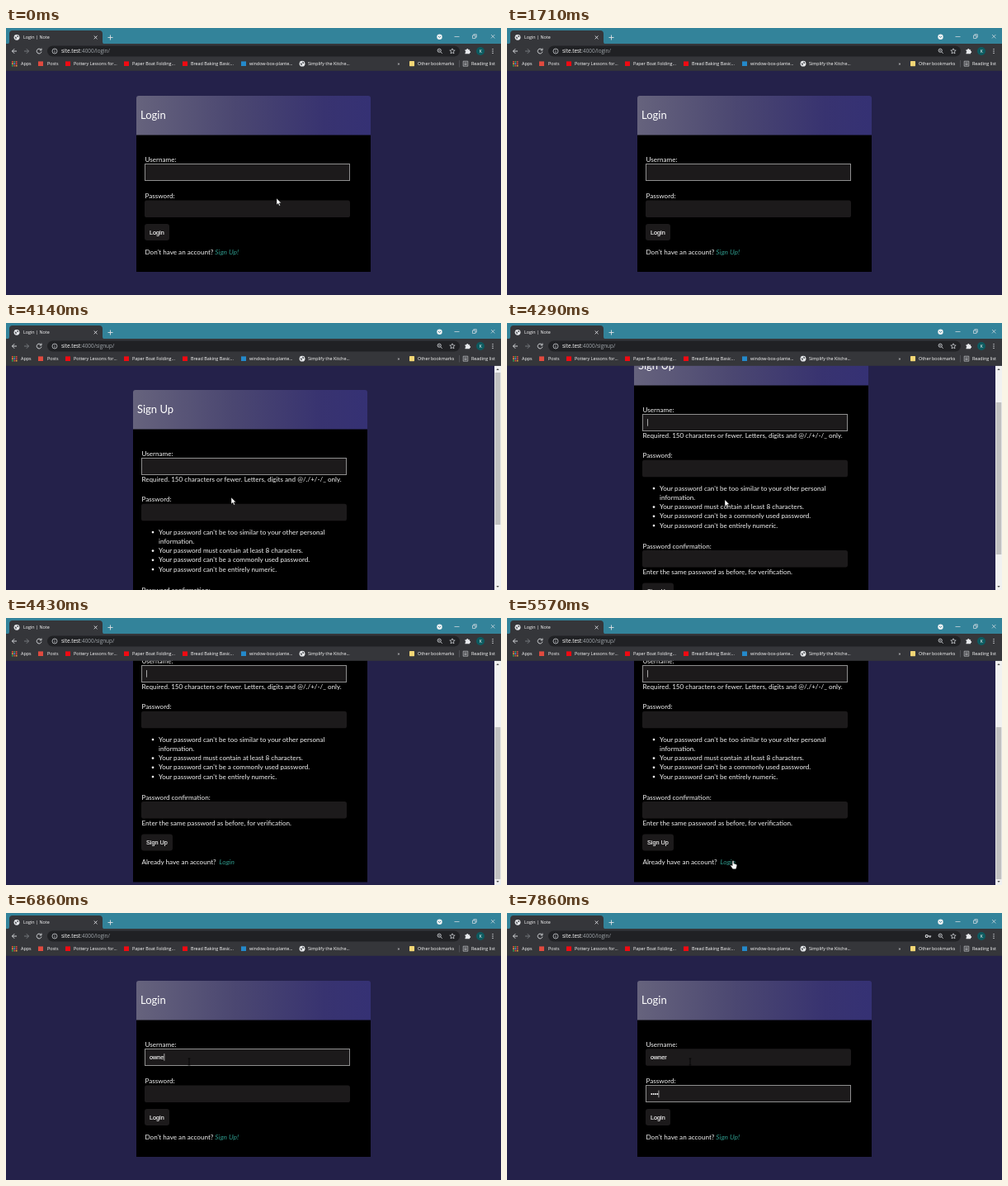
These frames come from a looping animation (600x323 px, 8 s). An HTML page:

```html
<!DOCTYPE html>
<html lang="en">
<head>
<meta charset="utf-8">
<title>Login</title>
<style>
html, body { margin: 0; width: 100%; height: 100%; overflow: hidden; background: #24214a; }
svg { display: block; width: 100vw; height: 100vh; }
text { white-space: pre; }
.ui { font: 5.4px "Open Sans", "Noto Sans", sans-serif; fill: #fff; }
.url { font-size: 6.4px; }
.dim { fill: #a4a9ae; }
.page { font: 400 8.1px Lato, sans-serif; fill: #f4f4f4; }
.head { font: 400 13px Lato, sans-serif; fill: #fff; }
.link { font-size: 8.4px; font-style: italic; fill: #2f9a8c; }
.form { font: 7.25px "Liberation Sans", Arial, sans-serif; fill: #fff; stroke: #fff; stroke-width: .12; }
.icon { fill: none; stroke: #dfe1e5; stroke-width: .9; }
.box { fill: #1c1a1b; }
.focus { fill: none; stroke: #8e8e8e; stroke-width: 1; }
.caret { stroke: #ccc; stroke-width: .8; }
</style>
</head>
<body>
<svg id="stage" viewBox="0 0 600 323" preserveAspectRatio="none"></svg>
<script>
const text = (x, y, str, cls, id = '') =>
  `<text x="${x}" y="${y}" class="${cls}"${id && ` id="${id}"`}>${str}</text>`;
const rect = (x, y, w, h, fill, r = 0) =>
  `<rect x="${x}" y="${y}" width="${w}" height="${h}" rx="${r}" fill="${fill}"/>`;
const dot = (x, y, r, fill) => `<circle cx="${x}" cy="${y}" r="${r}" fill="${fill}"/>`;
const icon = (d, extra = '') => `<path class="icon" d="${d}" ${extra}/>`;

// Page parts share the login card's coordinates.
const field = (label, labelY, y) =>
  text(168.5, labelY, label, 'page') + `<rect class="box" x="168" y="${y}" width="249" height="20.5" rx="2.6"/>`;
const button = (y, w, label) =>
  rect(168, y, w, 20, '#1c1a1b', 3) + text(174, y + 12.5, label, 'form');
const card = (title, height) =>
  rect(158, 100, 284, height - 18, '#000') +
  `<path d="M158 129.5V85a3 3 0 0 1 3-3h278a3 3 0 0 1 3 3v44.5z" fill="url(#band)"/>` +
  text(163, 110, title, 'head');

const loginPage = card('Login', 213) +
  field('Username:', 161.8, 164.3) + field('Password:', 205.8, 208.5) +
  button(237, 30, 'Login') +
  text(168.5, 273.6, "Don't have an account?", 'page') + text(253.3, 273.6, 'Sign Up!', 'page link');

const rules = [
  "Your password can't be too similar to your other personal", 'information.',
  'Your password must contain at least 8 characters.',
  "Your password can't be a commonly used password.",
  "Your password can't be entirely numeric."
];
const signupPage = card('Sign Up', 344.5) +
  field('Username:', 161.8, 164.3) +
  text(168.5, 192.8, 'Required. 150 characters or fewer. Letters, digits and @/./+/-/_ only.', 'page') +
  field('Password:', 217.3, 219.8) +
  rules.map((rule, i) => {
    const y = 256.7 + i * 11.25;
    return text(189, y, rule, 'page') + (i === 1 ? '' : dot(182, y - 2.6, 1.35, '#f4f4f4'));
  }).join('') +
  field('Password confirmation:', 326.8, 328.9) +
  text(168.5, 357.6, 'Enter the same password as before, for verification.', 'page') +
  button(368.6, 38, 'Sign Up') +
  text(168.5, 405.3, 'Already have an account?', 'page') + text(262.5, 405.3, 'Login', 'page link');

const globe = (x, y) => dot(x, y, 3.4, '#e8eaed') +
  `<path d="M${x - 2.4} ${y - 1}l2 .6 .3 1.4-1 1.4zM${x + .3} ${y - 2.6}l2 1.2-.6 1.4-1.4-.8z" fill="#4a4d52"/>`;

const bookmarks = [
  [42, 50, 'Posts', '#e04a3f'],
  [75, 82, 'Pottery Lessons for...', '#f00a12'],
  [146, 153, 'Paper Boat Folding...', '#f00a12'],
  [217, 224, 'Bread Baking Basic...', '#f00a12'],
  [288, 295, 'window-box-plante...', '#2489ca'],
  [359, 366, 'Simplify the Kitche...']
];
const gridColors = ['#ea4335', '#f2a33a', '#34a853', '#4f86ec', '#d94a45'];
const appGrid = Array.from({ length: 9 }, (_, i) =>
  rect(7 + i % 3 * 2.4, 40 + Math.floor(i / 3) * 2.4, 1.7, 1.7, gridColors[i * 2 % 5])).join('');

const browser =
  rect(0, 0, 600, 20, '#33839a') + rect(0, 19, 600, 32.8, '#35363a') +
  '<path d="M1 19.5q3 0 3-3V7q0-4 4-4h105q4 0 4 4v9.5q0 3 3 3z" fill="#35363a"/>' +
  globe(13, 11.3) + text(21, 13.3, 'Login | Note', 'ui') +
  icon('M106.7 9.5l3.8 3.8M110.5 9.5l-3.8 3.8M123.5 11.5h6M126.5 8.5v6') +
  dot(525.5, 10.7, 3.2, '#f1f3f4') + icon('M524 10l1.5 1.5 1.5-1.5', 'style="stroke:#33839a"') +
  icon('M543.5 10.5h6M565.5 9h3.5v3.5h-3.5zM566.8 9v-1.3h3.5v3.5h-1.3M588 8l4.4 4.4M592.4 8l-4.4 4.4', 'style="stroke-width:.7"') +
  icon('M13 28H7.5M10.2 25.2L7.4 28l2.8 2.8') +
  icon('M22 28h5.5M24.8 25.2l2.8 2.8-2.8 2.8', 'style="stroke:#7c7f84"') +
  icon('M42.4 26.2a2.9 2.9 0 1 0 .6 2.4M43 24.6v2.3h-2.3') +
  rect(50, 21.5, 500, 13, '#202124', 6.5) +
  icon('M62 28a3 3 0 1 1-6 0a3 3 0 1 1 6 0M59 27.5v2.2M59 26v.7', 'style="stroke-width:.7"') +
  text(67, 30.2, '', 'ui url', 'url') +
  `<g id="key">${icon('M510.2 28a1.5 1.5 0 1 1-3 0a1.5 1.5 0 1 1 3 0h4M512.8 28v1.7', 'style="stroke-width:1.1"')}</g>` +
  icon('M527.3 27.2a2.1 2.1 0 1 1-4.2 0a2.1 2.1 0 1 1 4.2 0M526.7 28.8l2 2M524.3 27.2h1.8', 'style="stroke-width:.8"') +
  icon('M541 24.8l.9 2.1 2.3.2-1.8 1.5.6 2.3-2-1.2-2 1.2.6-2.3-1.8-1.5 2.3-.2z', 'style="stroke-width:.7"') +
  '<path d="M556.5 26.2h1.7a1.1 1.1 0 0 1 2.2 0h1.7v1.7a1.1 1.1 0 0 1 0 2.2v1.2h-5.6v-1.5a1.1 1.1 0 0 0 0-2.1z" fill="#e8eaed"/>' +
  dot(575, 28, 5, '#0d5b60') + text(573.4, 30, 'K', 'ui') +
  [25.6, 28, 30.4].map(y => dot(590, y, .7, '#e8eaed')).join('') +
  appGrid + text(18, 45.1, 'Apps', 'ui') +
  bookmarks.map(([x, tx, name, color]) =>
    (color ? rect(x - 3, 40.4, 6, 5.6, color) : globe(x, 43.2)) + text(tx, 45.1, name, 'ui')).join('') +
  text(474.5, 45.1, '»', 'ui') +
  rect(489, 40, 6, 6.2, '#f3d675', .6) + text(499, 45.1, 'Other bookmarks', 'ui') +
  rect(549, 39, .6, 8.5, '#606368') +
  icon('M554.2 40.2h5.6v6h-5.6zM555.4 42h3.2M555.4 43.3h3.2M555.4 44.6h3.2', 'style="stroke-width:.6"') +
  text(564, 45.1, 'Reading list', 'ui');

const scrollbar = rect(592, 51.5, 8, 272, '#f1f1f1') +
  '<path d="M594.3 57l1.7-2 1.7 2zM594.3 318l1.7 2 1.7-2z" fill="#505050"/>' +
  '<rect id="thumb" x="592.7" y="60" width="6.6" height="184" fill="#c1c1c1"/>';

const cursors = `
  <path id="arrow" d="M0 0v8l1.9-1.7 1.3 2.9 1.3-.6-1.3-2.8h2.5z" fill="#fff" stroke="#000" stroke-width=".4"/>
  <path id="hand" d="M-.9.8q.9-1.3 1.8 0v3l3 .9q1 .4.8 1.7l-.6 2.4-.6 1.700H-.3l-2.8-4q-.2-1.2.9-.9l1.300 1z" fill="#fff" stroke="#000" stroke-width=".4"/>
  <path id="beam" d="M-1.4-4H1.4M0-4V4M-1.4 4H1.4" fill="none" stroke="#000" stroke-width=".8"/>`;

document.getElementById('stage').innerHTML = `
  <defs><linearGradient id="band">
    <stop offset="0" stop-color="#66637d"/><stop offset=".42" stop-color="#4b4771"/>
    <stop offset=".8" stop-color="#383370"/><stop offset="1" stop-color="#353174"/>
  </linearGradient></defs>
  <rect width="600" height="323" fill="#24214a"/>
  <g id="login">${loginPage}</g>
  <g id="signup"><g id="sheet">${signupPage}</g>${scrollbar}</g>
  <g id="entry">
    <rect id="ring" class="focus" x="168.5" width="248" height="20"/>
    <path id="caret" class="caret" d="M0 0v8.6"/>
  </g>
  ${text(174, 176.8, '', 'form', 'user')}
  <g id="secret">${[0, 1, 2, 3].map(i => dot(175.3 + i * 2.35, 219, .95, '#fff')).join('')}</g>
  ${browser}<g id="pointer">${cursors}</g>`;

const el = {};
document.querySelectorAll('[id]').forEach(node => el[node.id] = node);
const show = (node, on) => node.style.display = on ? '' : 'none';
const move = (node, x, y) => node.setAttribute('transform', `translate(${x} ${y})`);

// The screen advances in 56 steps of 1/7 s.
const STEPS = 56, STEP = 1000 / 7, LOOP = 8000;
const USER = 'owner';
const OPEN_SIGNUP = 26, BACK = 40, TYPE = 45, TO_PASSWORD = 50, TYPE_SECRET = 52;

// step, x, y, shape
const path = [
  [0, 328, 206, 'arrow'], [4, 302, 240, 'arrow'], [7, 240, 198, 'arrow'], [8, 213, 203, 'beam'],
  [17, 213, 203, 'beam'], [18, 222, 230, 'arrow'], [20, 256, 254, 'arrow'], [23, 274, 268, 'hand'],
  [25, 274.5, 273, 'hand'], [27, 274, 262, 'arrow'], [29, 273, 211, 'arrow'], [31, 255, 216.5, 'beam'],
  [33, 255, 216.5, 'beam'], [34, 262, 252, 'arrow'], [37, 273, 291, 'hand'], [41, 275, 295.5, 'hand'],
  [42, 270, 272, 'arrow'], [43, 246, 234, 'arrow'], [44, 224, 184, 'beam'], [45, 222, 180, 'beam']
];

function drawPointer(n) {
  let i = path.length - 1;
  while (path[i][0] > n) i--;
  const a = path[i], b = path[i + 1] || a;
  const k = b === a ? 0 : (n - a[0]) / (b[0] - a[0]);
  move(el.pointer, a[1] + (b[1] - a[1]) * k, a[2] + (b[2] - a[2]) * k);
  for (const shape of ['arrow', 'hand', 'beam']) show(el[shape], shape === a[3]);
}

function caretOn(n) {
  if (n >= TYPE) return true;
  if (n >= BACK) return (n - BACK >> 1) % 2 === 0;
  if (n >= OPEN_SIGNUP) return (n - OPEN_SIGNUP >> 1) % 2 === 0;
  return (n >> 1) % 2 === 1;
}

function draw(n) {
  const onSignup = n >= OPEN_SIGNUP && n < BACK;
  const scroll = n < 30 ? 0 : n < 31 ? 53 : 106;
  const letters = Math.max(0, Math.min(USER.length, n - TYPE + 1));
  const dots = Math.max(0, n - TYPE_SECRET + 1);
  const inPassword = n >= TO_PASSWORD;

  show(el.login, !onSignup);
  show(el.signup, onSignup);
  move(el.sheet, -4, -1 - scroll);
  move(el.thumb, 0, scroll * .68);
  move(el.entry, onSignup ? -4 : 0, onSignup ? -1 - scroll : 0);
  el.url.innerHTML = `site.test<tspan class="dim">:4000/${onSignup ? 'signup' : 'login'}/</tspan>`;

  show(el.entry, n !== OPEN_SIGNUP - 1);
  el.ring.setAttribute('y', inPassword ? 208.5 : 164.5);
  el.user.textContent = USER.slice(0, letters);
  [...el.secret.children].forEach((c, i) => show(c, i < dots));
  show(el.key, dots > 0);
  const typed = inPassword ? dots * 2.35 : letters && el.user.getComputedTextLength();
  move(el.caret, 174.5 + typed, inPassword ? 214.6 : 170.1);
  show(el.caret, caretOn(n));
  drawPointer(n);
}

let last = -1;
function tick() {
  const n = Math.floor((performance.now() % LOOP + 5) / STEP) % STEPS;
  if (n !== last) draw(last = n);
  requestAnimationFrame(tick);
}
tick();
</script>
</body>
</html>
```
